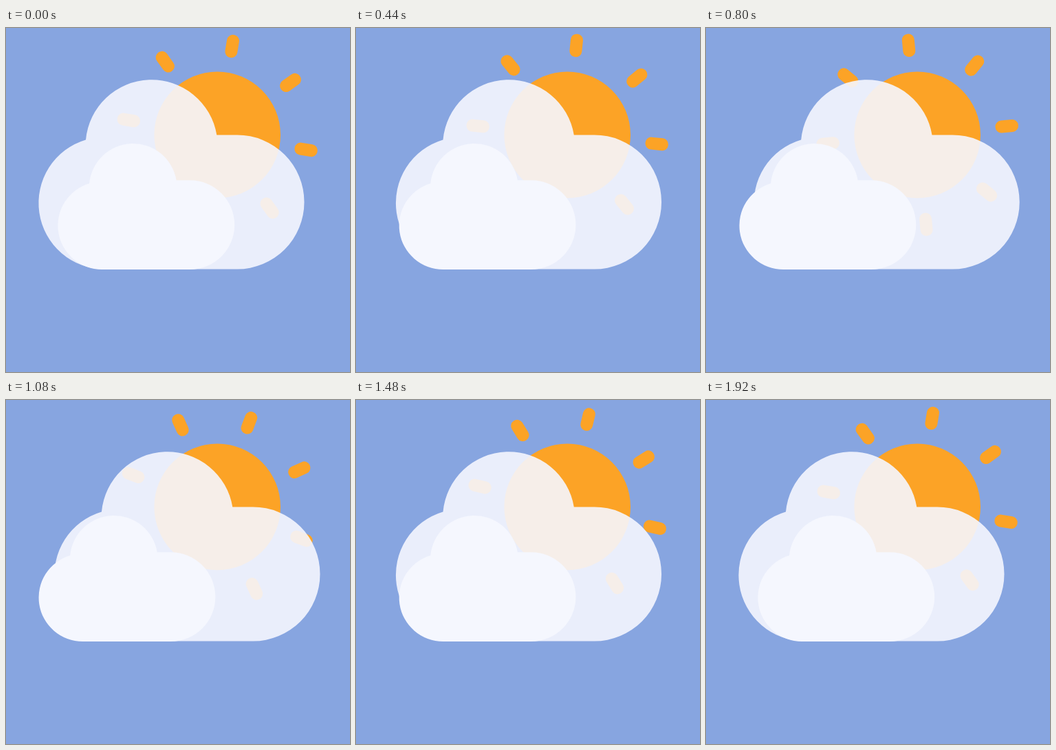
Recreate the animation shown at these times as an HTML page. Size 500 by 500 pixels, loop 2 s.

```html
<!DOCTYPE html>
<html lang="en">
<head>
<meta charset="utf-8">
<title>Sun and clouds</title>
<style>
  html, body { margin: 0; width: 100%; height: 100%; overflow: hidden; background: #87a5e0; }
  svg { display: block; width: 100vw; height: 100vh; }
</style>
</head>
<body>
<svg viewBox="0 0 500 500">
  <defs>
    <path id="cloud" d="M143.5 350.5A96 96 0 0 1 116 162.5A96 96 0 0 1 306.3 155.5H336A97.5 97.5 0 0 1 336 350.5Z"/>
  </defs>
  <g fill="#fca326" transform="translate(307.2 155.4)">
    <circle r="91.8"/>
    <g id="rays"></g>
  </g>
  <use id="back" href="#cloud" fill="#f5f7fe" opacity=".9"/>
  <use id="front" href="#cloud" fill="#f5f7fe"/>
</svg>
<script>
  const LOOP = 2000, STEP = 40, STEPS = 48;
  const RAYS = 8, START_ANGLE = 9.46, TURN = 180;
  const [rays, back, front] = ["rays", "back", "front"].map(id => document.getElementById(id));

  for (let i = 0; i < RAYS; i++) {
    const ray = document.createElementNS("http://www.w3.org/2000/svg", "rect");
    const attrs = { x: -9, y: -147.4, width: 18, height: 33.5, rx: 8.7, transform: `rotate(${i * 360 / RAYS})` };
    for (const name in attrs) ray.setAttribute(name, attrs[name]);
    rays.append(ray);
  }

  const ease = u => u * u * (3 - 2 * u);
  const place = (el, transform) => el.setAttribute("transform", transform);

  function draw(time) {
    // The last step is held until the loop restarts.
    const p = Math.min(Math.floor(time % LOOP / STEP), STEPS) / STEPS;
    const drift = ease(1 - Math.abs(1 - 2 * p));
    place(rays, `rotate(${START_ANGLE + TURN * p})`);
    place(back, `translate(${24 * drift} 0)`);
    place(front, `translate(${43.9 - 29.1 * drift} 117.9) scale(.665)`);
  }

  const start = performance.now();
  function tick() {
    draw(performance.now() - start);
    requestAnimationFrame(tick);
  }
  tick();
</script>
</body>
</html>
```
